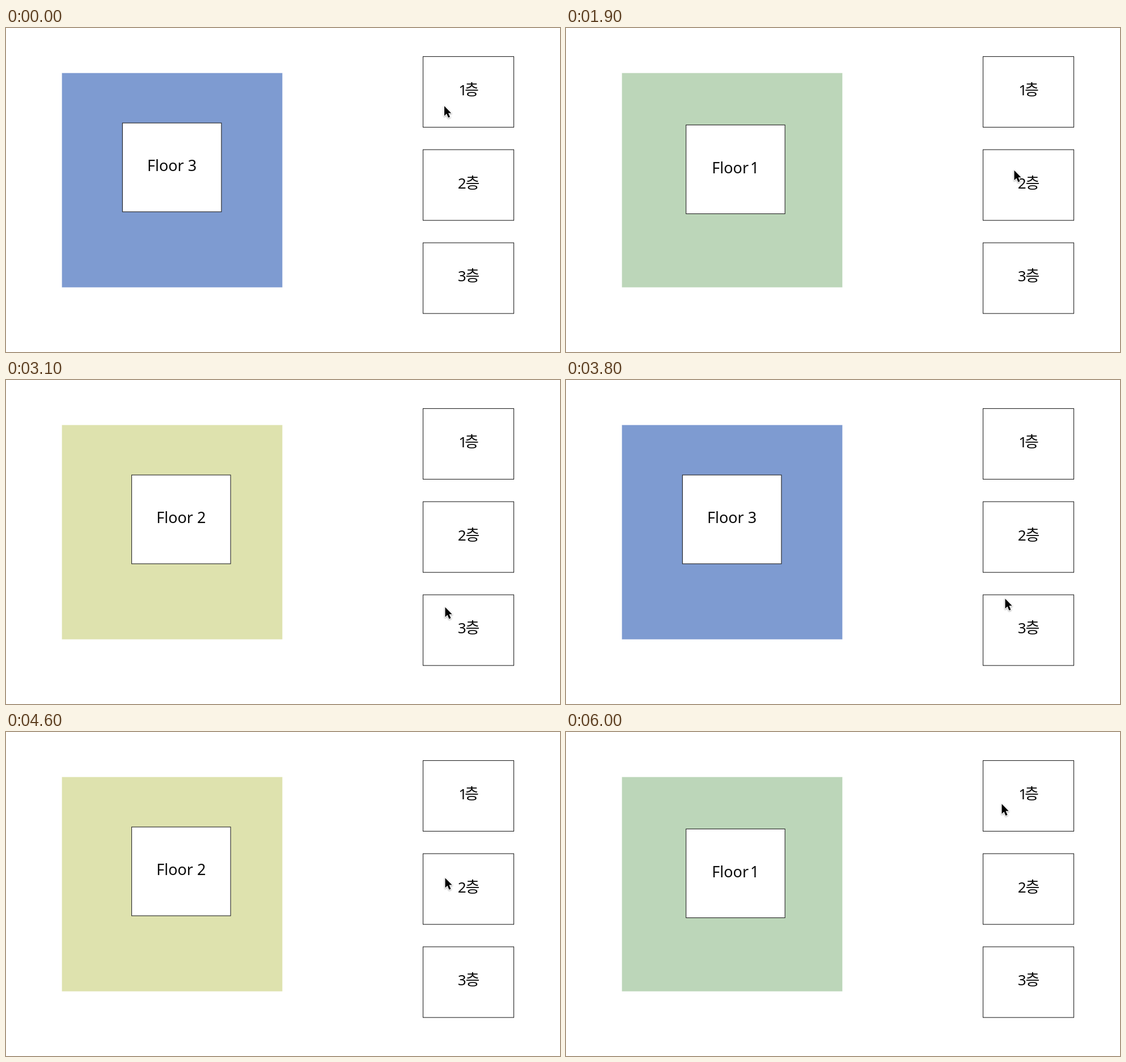
These frames come from a looping animation (977 by 573 pixels, 6.5 s). An HTML page:

```html
<!DOCTYPE html>
<html lang="ko">
<head>
<meta charset="utf-8">
<title>Floor switcher</title>
<style>
  html, body { margin: 0; width: 100%; height: 100%; overflow: hidden; background: #fff; }
  svg { display: block; width: 977px; height: 573px; }
  text { font-family: "Noto Sans", "Noto Sans CJK KR", sans-serif; font-size: 27px; text-anchor: middle; fill: #0a0a0a; }
  .digit { font-size: 26px; }
  .box { fill: #fff; stroke: #242424; stroke-width: 1.1; }
  #area { stroke: #fff; stroke-opacity: .3; }
  #arrow { filter: drop-shadow(0.5px 1.5px 1.2px rgba(0, 0, 0, .35)); }
</style>
</head>
<body>
<svg viewBox="0 0 977 573">
  <rect id="area" x="98.5" y="79.5" width="389" height="379.3"/>
  <g id="room">
    <rect class="box" width="174.5" height="157"/>
    <text id="label" x="87.2" y="85"></text>
  </g>
  <g id="buttons"></g>
  <g id="pointer">
    <circle id="ring" r="31.5" fill="none" stroke="#111" stroke-width="2.5"/>
    <path id="arrow" d="M0 0V17.4L4 13.6L6.9 20.6L10 19.3L7 12.4H12.2Z"
      fill="#000" stroke="#fff" stroke-width="2.4" stroke-linejoin="round" paint-order="stroke"/>
  </g>
</svg>
<script>
const LOOP = 6500, STEP = 100;
const $ = id => document.getElementById(id);

const floors = {
  1: { fill: '#bcd6b9', at: [211.7, 171.5] },
  2: { fill: '#dee2ae', at: [221.6, 168] },
  3: { fill: '#7e9bd1', at: [205.4, 168] }
};

// Each trip: pointer travels to a spot, presses, then the floor swaps.
const trips = [
  { floor: 1, spot: [773, 138], press: [500, 600], swap: 800 },
  { floor: 1, press: [900, 1000] },
  { floor: 2, spot: [790.5, 251.8], move: [1200, 1400], press: [1800, 1900], swap: 2000 },
  { floor: 3, spot: [774.5, 401.8], move: [2400, 2600], press: [3000, 3100], swap: 3200 },
  { floor: 2, spot: [774.5, 258.2], move: [3700, 4200], press: [4300, 4500], swap: 4600 },
  { floor: 1, spot: [768.5, 127.3], move: [5200, 5600], press: [5800, 6000], swap: 6000 }
];

const ease = p => p * p * (3 - 2 * p);
const progress = (t, [start, end]) => ease(Math.min(1, Math.max(0, (t - start) / (end - start))));

function pointerAt(t) {
  return trips.filter(trip => trip.move).reduce((from, { spot, move }) => {
    const p = progress(t, move);
    return from.map((v, i) => v + (spot[i] - v) * p);
  }, trips[0].spot);
}

// The digit 1 sits tighter than the others.
const kern = n => n === 1 ? -4 : 0;

function showFloor(n) {
  const { fill, at } = floors[n];
  $('area').setAttribute('fill', fill);
  $('room').setAttribute('transform', `translate(${at})`);
  $('label').innerHTML = `Floor <tspan dx="${kern(n)}">${n}</tspan>`;
}

$('buttons').innerHTML = [1, 2, 3].map((n, i) => {
  const y = 50.5 + i * 164.7;
  return `<rect class="box" x="735.5" y="${y}" width="160" height="125"/>
    <text x="816" y="${y + 68.5}"><tspan class="digit">${n}</tspan><tspan dx="${kern(n) || -1}">층</tspan></text>`;
}).join('');

let shown;
function draw(t) {
  const floor = trips.reduce((last, trip) => t >= trip.swap ? trip.floor : last, 3);
  if (floor !== shown) showFloor(shown = floor);
  const pressed = trips.some(({ press: [down, up] }) => t >= down && t < up);
  $('ring').setAttribute('visibility', pressed ? 'visible' : 'hidden');
  $('pointer').setAttribute('transform', `translate(${pointerAt(t)})`);
}

const began = performance.now();
function tick() {
  const t = (performance.now() - began) % LOOP;
  draw(Math.floor(t / STEP) * STEP);
  requestAnimationFrame(tick);
}
tick();
</script>
</body>
</html>
```
